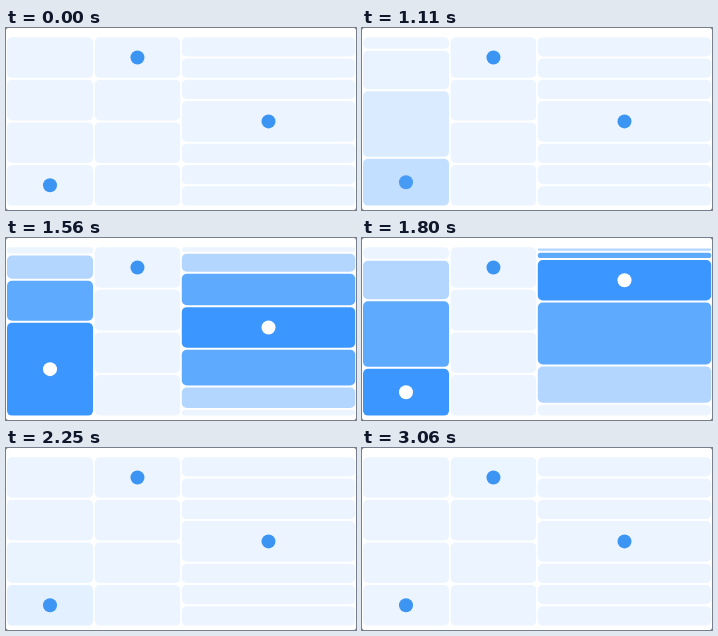
Write an HTML page that moves like this. It is 350 px wide and 182 px high and loops after 3510 ms.

```html
<!DOCTYPE html>
<html lang="en">
<head>
<meta charset="utf-8">
<title>Stretching cells</title>
<style>
  html, body { margin: 0; width: 100%; height: 100%; overflow: hidden; background: #555; }
  svg { display: block; width: 100%; height: 100%; }
</style>
</head>
<body>
<svg id="stage" viewBox="0 0 350 182">
  <rect width="350" height="182" rx="2" fill="#fff"/>
</svg>
<script>
const LOOP = 3510, FADE = 300;
const TOP = 9.2, SPAN = 170.4, GAP = 2;
const PALE = [236, 245, 255], BLUE = [59, 151, 255], DOT = [61, 149, 243], WHITE = [255, 255, 255];
const TINT = [1, 0.8, 0.33, 0];   // strength by distance from the held cell
const SHARE = [5, 3, 1];          // room by distance while held

const stage = document.getElementById('stage');
const clamp = v => Math.min(1, Math.max(0, v));
const mix = (a, b, k) => `rgb(${a.map((v, i) => Math.round(v + (b[i] - v) * k))})`;
const easeOut = k => 1 - (1 - clamp(k)) ** 3;
const swing = k => (1 - Math.cos(Math.PI * clamp(k))) / 2;

function add(tag, attrs) {
  const el = document.createElementNS('http://www.w3.org/2000/svg', tag);
  set(el, attrs);
  return stage.appendChild(el);
}
function set(el, attrs) {
  for (const k in attrs) el.setAttribute(k, attrs[k]);
}

// drag(t) gives the shift of the held cell's top and bottom edge
const columns = [
  {
    x: 1, w: 86, above: 3, below: 0, unit: SPAN / 4, press: 1085, release: 2066,
    drag: t => [-58 * Math.sin(Math.PI * clamp((t - 1085) / 740)), 0]
  },
  {
    x: 88.7, w: 85.5, above: 0, below: 3, unit: SPAN / 4, press: 2465, release: 2805,
    drag: t => [0, 118.2 * Math.sin(Math.PI / 2 * clamp((t - 2465) / 230))]
  },
  {
    x: 175.8, w: 173.4, above: 3, below: 3, unit: SPAN / 8, press: 1276, release: 1887,
    drag: t => {
      const d = 15 * swing((t - 1250) / 160) - 67 * swing((t - 1410) / 420);
      return [d, d];
    }
  }
];

for (const c of columns) {
  c.cells = Array.from({ length: c.above + c.below + 1 }, () => add('rect', { x: c.x, width: c.w }));
  c.dot = add('circle', { cx: c.x + c.w / 2, r: 7 });
  c.restTop = TOP + c.above * c.unit;
  c.restEnd = TOP + SPAN - c.below * c.unit;
}

function glow(c, t) {
  if (t < c.press) return 0;
  return t < c.release
    ? easeOut((t - c.press) / FADE)
    : 1 - easeOut((t - c.release) / FADE);
}

function drawColumn(c, t) {
  const held = t >= c.press && t < c.release;
  const [dTop, dEnd] = held ? c.drag(t) : [0, 0];
  const top = c.restTop + dTop, end = c.restEnd + dEnd;
  const p = glow(c, t);
  let y = TOP;
  c.cells.forEach((cell, i) => {
    const dist = Math.abs(i - c.above);
    const room = i < c.above ? top - TOP : TOP + SPAN - end;
    const size = dist ? room * (held ? SHARE[dist - 1] / 9 : 1 / 3) : end - top;
    const height = Math.max(0, size - GAP);
    set(cell, {
      y, height,
      rx: Math.min(5, height / 2),
      fill: mix(PALE, BLUE, TINT[dist] * p ** (1 + 0.4 * dist))
    });
    y += size;
  });
  set(c.dot, { cy: (top + end - GAP) / 2, fill: mix(DOT, WHITE, p * p) });
}

function render(t) {
  columns.forEach(c => drawColumn(c, t));
}

let start;
function tick(now) {
  start ??= now;
  render((now - start) % LOOP);
  requestAnimationFrame(tick);
}
render(0);
requestAnimationFrame(tick);
</script>
</body>
</html>
```
